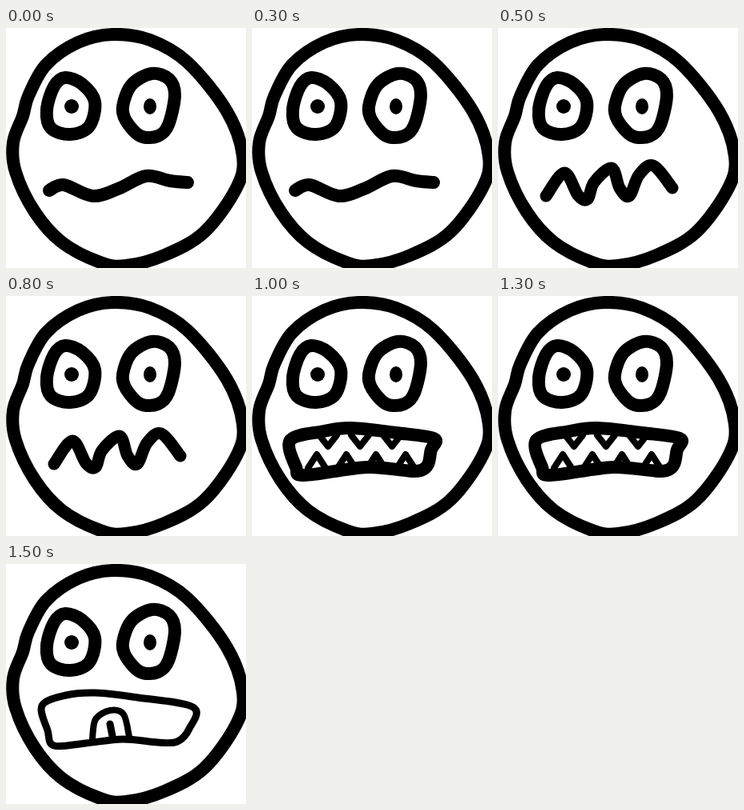
Recreate the animation shown at these times as an HTML page. Size 300 by 300 pixels, loop 2000 ms.

```html
<!DOCTYPE html>
<html lang="en">
<head>
<meta charset="utf-8">
<title>Worried face</title>
<style>
  html, body { margin: 0; width: 100%; height: 100%; overflow: hidden; background: #fff; }
  svg { display: block; width: 100vw; height: 100vh; }
  path { fill: none; stroke: #000; stroke-linecap: round; stroke-linejoin: round; }
</style>
</head>
<body>
<svg id="stage" viewBox="0 0 300 300">
  <g id="face">
    <ellipse cx="82" cy="98" rx="9" ry="9"/>
    <ellipse cx="180" cy="98" rx="8" ry="10"/>
  </g>
</svg>
<script>
const NS = 'http://www.w3.org/2000/svg';
const HOLD = 500;
const stage = document.getElementById('stage');
const face = document.getElementById('face');

function add(parent, tag, attrs = {}) {
  const el = document.createElementNS(NS, tag);
  for (const key in attrs) el.setAttribute(key, attrs[key]);
  return parent.appendChild(el);
}

// Brush stroke through a few key points (Catmull-Rom as cubic Beziers)
function brush(parent, width, keys, closed = false) {
  const pts = keys.split(' ').map(p => p.split(',').map(Number));
  const n = pts.length;
  const at = i => pts[closed ? (i + n) % n : Math.max(0, Math.min(n - 1, i))];
  const bend = (p, from, to) => p.map((v, k) => v + (to[k] - from[k]) / 6);
  let d = 'M' + pts[0];
  for (let i = 0; i < (closed ? n : n - 1); i++) {
    const b = at(i), c = at(i + 1);
    d += `C${bend(b, at(i - 1), c)} ${bend(c, at(i + 2), b)} ${c}`;
  }
  add(parent, 'path', { d: closed ? d + 'Z' : d, 'stroke-width': width });
}

// Row of pointed teeth; a negative height points down
function teeth(parent, count, x, base, gap, height) {
  for (let i = 0; i < count; i++, x += gap) {
    const d = `M${x - 11},${base}L${x},${base - height}L${x + 11},${base}`;
    add(parent, 'path', { d, 'stroke-width': 8 });
  }
}

brush(face, 16, '133,8 90,18 50,46 28,85 21,110 9,143 12,180 36,230 70,268 118,293 150,297 198,284 248,255 288,200 296,160 276,104 227,43 180,15', true);
brush(face, 16, '74,62 95,70 111,92 104,123 80,133 56,125 51,102 60,73', true);
brush(face, 16, '182,57 204,64 211,84 203,121 190,135 168,135 150,116 146,98 157,71', true);

function wavy(g) {
  brush(g, 16, '54,203 72,196 108,210 140,201 175,185 205,191 227,193');
}

function zigzag(g) {
  brush(g, 15, '60,210 83,181 100,209 112,214 120,193 142,175 152,200 164,210 176,184 194,172 218,200');
}

function snarl(g) {
  brush(g, 16, '48,180 90,169 124,165 180,171 227,178 224,192 211,218 144,214 66,224 55,214', true);
  teeth(g, 3, 95, 174, 40, -14);
  teeth(g, 4, 81, 215, 37, 17);
}

function shout(g) {
  brush(g, 9, '45,177 75,164 112,161 165,167 234,179 229,206 214,222 190,223 146,219 100,224 60,227 52,208', true);
  brush(g, 8, '108,218 112,194 130,183 147,188 154,216');
  brush(g, 9, '130,200 133,215');
}

const mouths = [wavy, zigzag, snarl, shout].map(paint => {
  const g = add(stage, 'g');
  paint(g);
  return g;
});

function draw(time) {
  const now = Math.floor(time / HOLD) % mouths.length;
  mouths.forEach((g, i) => g.setAttribute('visibility', i === now ? 'visible' : 'hidden'));
}

const start = performance.now();
function tick() {
  draw(performance.now() - start);
  requestAnimationFrame(tick);
}
tick();
</script>
</body>
</html>
```
